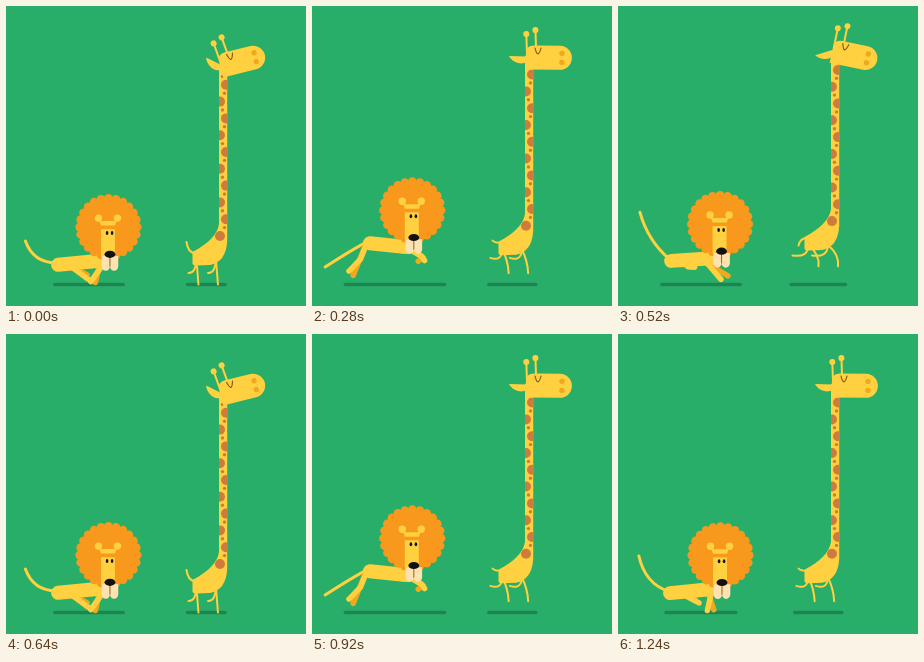
Animation, 300 px wide and 300 px high, one loop 1.28 s. Source, as an HTML page with a canvas:

```html
<!DOCTYPE html>
<html>
<head>
<meta charset="utf-8">
<title>Running lion and giraffe</title>
<style>
html, body { margin: 0; width: 100%; height: 100%; overflow: hidden; background: #28ae69; }
canvas { display: block; width: 300px; height: 300px; }
</style>
</head>
<body>
<canvas id="stage"></canvas>
<script>
const GREEN = '#28ae69', SHADOW = '#1f8453', YELLOW = '#ffd03f', AMBER = '#f0a81e',
  ORANGE = '#f8991d', BROWN = '#cf7b3e', CREAM = '#ffe2b0', DARK = '#7d5615';
const STEP = 40, STRIDE = 16, GROUND = 278.5;
const { sin, cos, max, min, abs, sqrt, PI } = Math;

const canvas = document.getElementById('stage');
const ratio = window.devicePixelRatio || 1;
canvas.width = canvas.height = 300 * ratio;
const ctx = canvas.getContext('2d');

const angleOf = step => 2 * PI * step / STRIDE;

function disc(x, y, rx, color, ry = rx) {
  ctx.fillStyle = color;
  ctx.beginPath();
  ctx.ellipse(x, y, rx, ry, 0, 0, 7);
  ctx.fill();
}

function stroke(points, width, color, curved) {
  const [x, y, ...rest] = points;
  ctx.strokeStyle = color;
  ctx.lineWidth = width;
  ctx.beginPath();
  ctx.moveTo(x, y);
  if (curved) ctx.quadraticCurveTo(...rest);
  else for (let i = 0; i < rest.length; i += 2) ctx.lineTo(rest[i], rest[i + 1]);
  ctx.stroke();
}

function shape(path, color) {
  ctx.fillStyle = color;
  ctx.fill(new Path2D(path));
}

function placed(x, y, degrees, draw) {
  ctx.save();
  ctx.translate(x, y);
  ctx.rotate(degrees * PI / 180);
  draw();
  ctx.restore();
}

function drawShadow(x, half) {
  stroke([x - half + 1.7, GROUND, x + half - 1.7, GROUND], 3.4, SHADOW);
}

function drawLionHead() {
  disc(0, 0, 29.8, ORANGE);
  for (let i = 0; i < 24; i++) {
    const a = i * PI / 12;
    disc(28.8 * cos(a), 28.8 * sin(a), 4.3, ORANGE);
  }
  disc(-10, -9, 3.7, YELLOW);
  disc(9, -9, 3.7, YELLOW);
  shape('M-10-9L-7-6H6L9-9L6.5-1.5H-7.5Z', YELLOW);
  shape('M-7.5 2H6.5V29H-7.5Z', YELLOW);
  disc(-1.4, 6, 1.3, '#111', 2);
  disc(3.6, 6, 1.3, '#111', 2);
  shape('M-6.8 29V39A4 4.5 0 0 0 1.5 39A4 4.5 0 0 0 9.8 39V29Z', CREAM);
  stroke([1.5, 28, 1.5, 39], 0.9, DARK);
  disc(1.5, 27.2, 5.4, '#111', 3.6);
}

// Feet follow ellipses; the knee sits halfway along the leg, pushed forward by its bend.
function drawLionLeg(hipX, hipY, footX, footY, bend, color) {
  const y = min(footY, GROUND - 2);
  stroke([hipX, hipY, (hipX + footX) / 2 + bend, (hipY + y) / 2 + bend / 4, footX, y], 5.5, color);
}

function drawLionLegs(step, rearY, chestY, color) {
  const a = angleOf(step);
  drawLionLeg(61 + 8 * cos(a + 0.8), rearY + 3,
    59 + 23 * cos(a + 0.1), 267 + 11 * cos(a - 1), 14 * max(0, cos(a - 4.1)), color);
  drawLionLeg(97 + 9.5 * sin(a), chestY + 4,
    101 - 18.5 * cos(a - 0.5), 265.5 + 11 * cos(a + 0.4), 9 * max(0, sin(a)), color);
}

function drawLion(step) {
  const a = angleOf(step), hop = cos(a + 0.26);
  const rearX = 55 - 3 * hop, rearY = 248.2 + 11 * hop, chestY = 248 + 7 * hop;
  drawShadow(83, 44 - 8 * cos(a));
  stroke([rearX - 2, rearY - 2, 34 - 7 * hop, rearY - 2 + 20 * sin(a),
    17 - 5 * sin(a - 0.5), 241.5 + 36 * sin(a - 0.18)], 3, YELLOW, true);
  drawLionLegs(step - 1, rearY, chestY, AMBER);
  stroke([rearX, rearY, 94, chestY], 14, YELLOW);
  drawLionLegs(step, rearY, chestY, YELLOW);
  placed(101.4 + 1.1 * hop, 212.8 + 8.6 * hop, 0, drawLionHead);
}

function drawGiraffeHead(nod) {
  placed(-10, 1, 42 - 70 * nod, () => shape('M1-2L-17-1.5C-14 4-4 8 1 3Z', YELLOW));
  for (const [x, y, length] of [[-9, -5, 18.5], [0, -11, 16.5]]) {
    placed(x, y, 6 * (nod - 1), () => {
      stroke([0, 0, 0, -length], 2, YELLOW);
      disc(0, -length, 3, YELLOW);
    });
  }
  shape('M-10 12V-4Q-10-12-2-12H24A12 12 0 0 1 24 12Z', YELLOW);
  stroke([-1, -9.5, 2, 2, 5, -9.5], 1.1, DARK, true);
  disc(26, -4.5, 2.7, AMBER);
  disc(26, 4.5, 2.7, AMBER);
}

function drawGiraffeLeg(hip, step, ground) {
  const a = angleOf(step), curl = 1 - cos(a);
  const footX = -3 + 13 * cos(a + 1.18);
  const footY = min(20 + 7 * cos(a) - 3 * sin(a) + 6 * sin(2 * a), ground - 254);
  stroke([hip, 254, hip + footX / 2 + 6 * abs(sin(a)) + 1.5 * curl,
    254 + footY / 2 + 3.5 * curl + 3 * sin(a), hip + footX, 254 + footY], 2, YELLOW, true);
}

function drawGiraffe(step) {
  // One bounce per half stride, with a slow rise and a sharp landing.
  const beat = step % (STRIDE / 2) / (STRIDE / 2);
  const air = sqrt(sin(PI * beat ** 1.25)), nod = air ** 1.5, lift = 15 * air;
  drawShadow(200.3, 20.5 + 8.5 * nod);
  ctx.save();
  ctx.translate(0, -lift);
  for (const hip of [190.5, 210]) {
    for (const phase of [0, STRIDE / 2]) drawGiraffeLeg(hip, step + phase, GROUND + lift);
  }
  const tailTip = -11 + 23 * nod + 6 * sin(2 * PI * beat);
  stroke([188, 247, 182, 247 + tailTip / 10, 180.5, 247 + tailTip], 2, YELLOW, true);
  const body = 'M213 60V218Q211 233 186.5 246V257Q186.5 259.5 190 259.5L204 259Q220 256 221.2 235V60Z';
  shape(body, YELLOW);
  ctx.clip(new Path2D(body));
  for (let i = 0; i < 10; i++) {
    const y = 230 - 16.8 * i, side = i % 2 ? 1 : -1;
    disc(217 + side * 3, y, 5, BROWN);
    disc(217.5 - side, y - 8.4, 1.7, BROWN);
  }
  ctx.restore();
  placed(223.9, 57.5 - 10.5 * nod, 26 * nod - 14, () => drawGiraffeHead(nod));
}

function render(now) {
  const step = Math.floor(now / STEP) % STRIDE;
  ctx.setTransform(ratio, 0, 0, ratio, 0, 0);
  ctx.lineCap = ctx.lineJoin = 'round';
  ctx.fillStyle = GREEN;
  ctx.fillRect(0, 0, 300, 300);
  drawLion(step);
  drawGiraffe(step);
}

let start;
function tick(now) {
  start ??= now;
  render(now - start);
  requestAnimationFrame(tick);
}
render(0);
requestAnimationFrame(tick);
</script>
</body>
</html>
```
